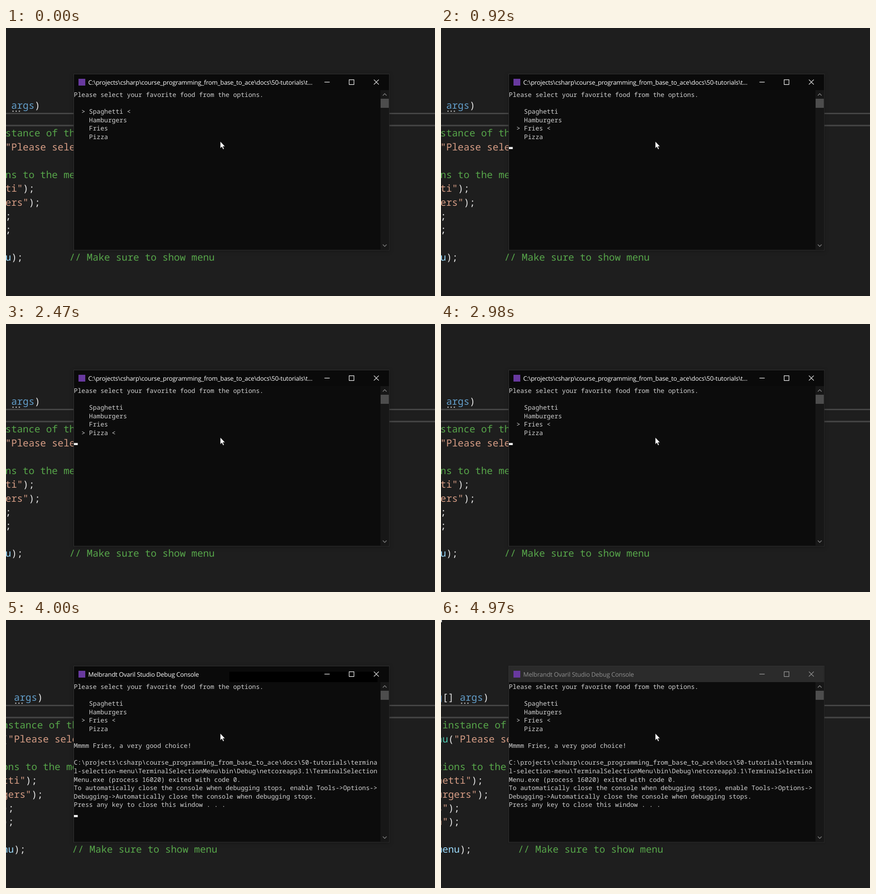
An HTML page that plays this animation: 947x591 px, repeating every 5070 ms.

```html
<!DOCTYPE html>
<html lang="en">
<head>
<meta charset="utf-8">
<title>Terminal selection menu</title>
<style>
html, body { margin: 0; width: 100%; height: 100%; overflow: hidden; background: #1e1e1e; }
svg { display: block; width: 947px; height: 591px; }
text { white-space: pre; text-rendering: geometricPrecision; }

#code { font: 500 21.4px "Noto Sans Mono", monospace; fill: #e4e4e4; animation-name: scroll; }
.comment { fill: #57a64a; }
.string { fill: #d69d85; }
.type { fill: #4ec9b0; }
.key { fill: #569cd6; }
.dim { fill: #639fcb; }
.local { fill: #9cdcfe; }

#console { font: 13.96px "Noto Sans Mono", monospace; fill: #d2d2d2; }
.title { font: 13.7px "Open Sans", "Noto Sans", sans-serif; letter-spacing: -.22px; fill: #fff; }
.line { fill: none; stroke: #fff; stroke-width: 1.2; }

/* Hard cuts on one shared 5070 ms clock */
#code, #frame, .bar, .patch, .title, .line, #menu, #report, #caret, #end-caret {
  animation-duration: 5070ms;
  animation-timing-function: step-end;
  animation-iteration-count: infinite;
}
#frame { animation-name: shadow; }
.bar { animation-name: bar; }
.patch { fill: #000; animation-name: patch; }
.line { animation-name: stroke; }
#path { animation-name: path; }
#debug { animation-name: debug; }
#menu { animation-name: pick, blank; }
#report { animation-name: report; }
#caret { animation-name: caret; }
#end-caret { animation-name: blink; }
#open { transform: translateY(calc(var(--row) * 18.62px)); }
#close { transform: translate(calc(var(--col) * 8.376px), calc(var(--row) * 18.62px)); }

@keyframes pick {
  0%, 28.59%, 100% { --row: 0; --col: 0; }
  10.45%, 38.85% { --row: 1; --col: 1; }
  18.14%, 43.78%, 58.77% { --row: 2; --col: -4; }
  26.03%, 48.71% { --row: 3; --col: -4; }
}
@keyframes blank {
  0%, 10.45%, 26.03%, 58.77%, 100% { opacity: 1; }
  7.49%, 23.07%, 56.4% { opacity: 0; }
}
@keyframes caret {
  0%, 71.2%, 100% { opacity: 0; }
  10.45% { opacity: 1; }
}
@keyframes blink {
  0%, 81.26%, 98.02%, 100% { opacity: 0; }
  71.2%, 90.72% { opacity: 1; }
}
@keyframes report {
  0%, 100% { opacity: 0; }
  71.2% { opacity: 1; }
}
@keyframes path {
  0%, 100% { opacity: 1; }
  71.2% { opacity: 0; }
}
@keyframes debug {
  0%, 100% { opacity: 0; fill: #fff; }
  71.2% { opacity: 1; fill: #fff; }
  98.02% { opacity: 1; fill: #8f8f8f; }
}
@keyframes patch {
  0%, 98.02%, 100% { opacity: 0; transform: none; }
  71.2% { opacity: 1; transform: none; }
  78.89% { opacity: 1; transform: translateX(343px); }
}
@keyframes bar {
  0%, 100% { fill: #0a0a0a; }
  98.02% { fill: #2b2b2b; }
}
@keyframes stroke {
  0%, 100% { stroke: #fff; }
  98.02% { stroke: #a0a0a0; }
}
@keyframes shadow {
  0%, 100% { filter: drop-shadow(0 2px 4px rgba(0, 0, 0, .25)); }
  98.02% { filter: drop-shadow(0 1px 2px rgba(0, 0, 0, .15)); }
}
@keyframes scroll {
  0%, 100% { transform: none; }
  78.89% { transform: translateX(6px); }
  81.26% { transform: translateX(12px); }
  83.62% { transform: translateX(18px); }
  85.99% { transform: translateX(24px); }
  88.36% { transform: translateX(30px); }
}
</style>
</head>
<body>
<svg viewBox="0 0 947 591">
  <defs>
    <clipPath id="bar-clip"><rect x="150" y="114" width="670" height="23"/></clipPath>
  </defs>
  <rect width="947" height="591" fill="#1e1e1e"/>
  <path d="M0 188.5H947M0 215.2H947" stroke="#464646" stroke-width="3.2"/>

  <g id="code">
    <rect x="-30" width="2" height="5"/>
    <path d="M14 183.5h3m4 0h3m4 0h3" stroke="#a5a5a5" stroke-width="2.6"/>
  </g>

  <rect id="frame" x="149.5" y="101.5" width="696.5" height="388.5" fill="#0c0c0c" stroke="#343434"/>
  <rect class="bar" x="150" y="102" width="695.5" height="35"/>
  <g clip-path="url(#bar-clip)"><rect class="patch" x="150" y="114" width="670" height="23"/></g>
  <rect x="160" y="112" width="15" height="15" fill="#68399f"/>
  <text class="title" id="path" x="181.5" y="124.6">C:\projects\csharp\course_programming_from_base_to_ace\docs\50-tutorials\t...</text>
  <text class="title" id="debug" x="181.5" y="124.6">Melbrandt Ovaril Studio Debug Console</text>
  <path class="line" d="M703 119.3H714.5M757.5 114.1h10.6v10.6h-10.6zM812.1 113.9l10.8 10.8m0 -10.8l-10.8 10.8"/>

  <rect x="826.5" y="137" width="19" height="352.5" fill="#171717"/>
  <rect x="827" y="156" width="18" height="20" fill="#4d4d4d"/>
  <path d="M831.8 149l4.2-4.2l4.2 4.2M831.8 477.5l4.2 4.2l4.2-4.2" fill="none" stroke="#7c7c7c" stroke-width="1.6"/>

  <g id="console">
    <g id="menu"></g>
    <g id="report"></g>
    <rect id="caret" x="150" y="262.4" width="8.4" height="4.6" fill="#f2f2f2"/>
    <rect id="end-caret" x="150" y="430" width="8.4" height="4.8" fill="#f2f2f2"/>
  </g>
  <path d="M473 250v15.4l3.5-3.3l2.6 5.6l2.4-1.1l-2.5-5.4h4.6z" fill="#fff" stroke="#000" stroke-width=".7"/>
</svg>
<script>
const byId = id => document.getElementById(id);

function addText(parent, x, y, parts) {
  const el = document.createElementNS("http://www.w3.org/2000/svg", "text");
  el.setAttribute("x", x);
  el.setAttribute("y", y);
  for (const [str, cls] of parts) {
    const span = document.createElementNS(el.namespaceURI, "tspan");
    span.textContent = str;
    if (cls) span.setAttribute("class", cls);
    el.append(span);
  }
  parent.append(el);
  return el;
}

// Editor lines: row, column, then coloured runs
const code = (row, col, ...parts) =>
  addText(byId("code"), -1.4 + col * 12.84, 178.3 + row * 30.46, parts);

code(0, -3, ["g", "key"], ["[] "], ["args", "dim"], [")"]);
code(2, -2, ["instance of the", "comment"]);
code(3, -3, ["nu", "type"], ["("], ['"Please select', "string"]);
code(5, -3, ["tions to the menu", "comment"]);
code(6, -3, ['hetti"', "string"], [");"]);
code(7, -3, ['urgers"', "string"], [");"]);
code(8, -3, ['s"', "string"], [");"]);
code(9, -3, ['a"', "string"], [");"]);
code(11, -3, ["menu", "local"], [");"]);
code(11, 11, ["// Make sure to show menu", "comment"]);

const print = (group, row, col, str) =>
  addText(byId(group), 149.8 + col * 8.376, 151.8 + row * 18.62, [[str]]);

print("menu", 0, 0, "Please select your favorite food from the options.");
["Spaghetti", "Hamburgers", "Fries", "Pizza"].forEach((food, i) => print("menu", 2 + i, 4, food));
print("menu", 2, 2, ">").id = "open";
print("menu", 2, 14, "<").id = "close";

[
  "Mmmm Fries, a very good choice!",
  "",
  "C:\\projects\\csharp\\course_programming_from_base_to_ace\\docs\\50-tutorials\\termina",
  "l-selection-menu\\TerminalSelectionMenu\\bin\\Debug\\netcoreapp3.1\\TerminalSelection",
  "Menu.exe (process 16020) exited with code 0.",
  "To automatically close the console when debugging stops, enable Tools->Options->",
  "Debugging->Automatically close the console when debugging stops.",
  "Press any key to close this window . . ."
].forEach((str, i) => print("report", 7 + i, 0, str));
</script>
</body>
</html>
```
